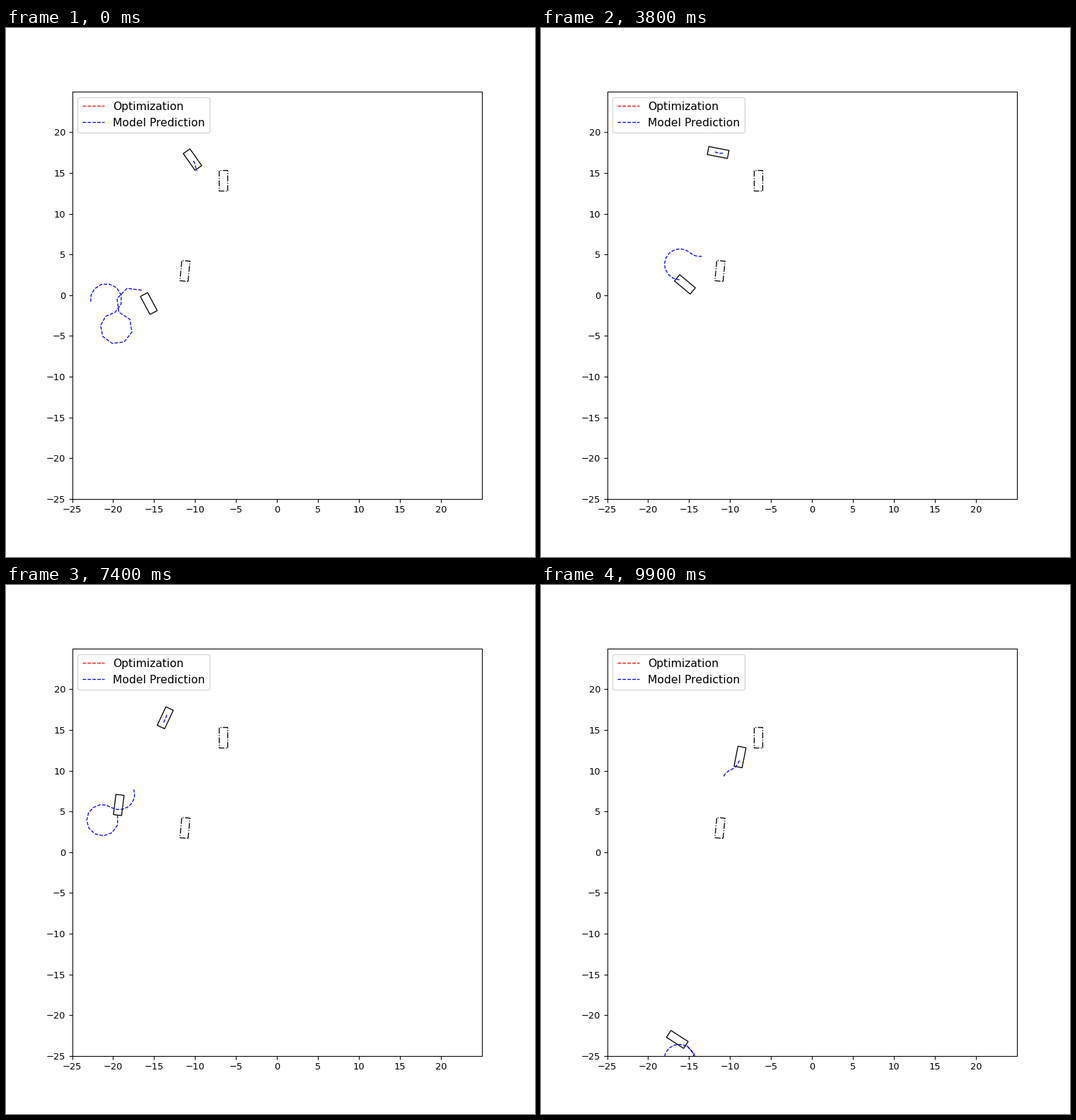
Animation of 748x748 px, one loop 10 s. Source, as a matplotlib script:

```python
import numpy as np
import matplotlib.pyplot as plt
from matplotlib.animation import FuncAnimation
from matplotlib.patches import Rectangle

FRAMES, INTERVAL = 100, 100
CURVATURE = 0.515          # heading change per unit travelled at full lock
LENGTH, WIDTH = 2.5, 1.0
STEP = np.arange(20)       # prediction horizon

# Waypoints: x, y, heading (deg), speed, steps until the car would stop,
# step where it starts to steer right, steps it keeps steering right
TIMES = [0, 24, 38, 54, 74, 83, 99]
LOWER = np.array([
    (-15.65, -1.03, 118, 1.85, 34, 4, 7.1),
    (-19.48, 0.40, 243, 0.74, 18, 1, 10),
    (-15.51, 1.32, 140, 0.86, 22, 1, 11.3),
    (-12.97, -2.64, 39, 0.97, 45, 1, 12),
    (-19.31, 5.79, 263, 1.25, 28, 0.6, 10.7),
    (-17.97, -6.08, 262, 1.50, 26, 0.35, 11.1),
    (-16.44, -22.99, 327, 1.42, 20, 0.3, 18),
])
# The upper car creeps, so only its steering start differs
UPPER = np.array([(*pose, 14, lead, 5) for *pose, lead in [
    (-10.32, 16.64, -55, 0.20, 0),
    (-10.13, 16.46, -62, -0.45, 14),
    (-11.46, 17.51, -11, -0.40, 14),
    (-13.55, 16.61, -121, 0.14, 14),
    (-13.64, 16.49, -115, -0.40, 0),
    (-13.80, 15.08, -69, 0.34, 5),
    (-8.79, 11.68, -101, 0.44, 0),
]])


def unit(angle):
    return np.array([np.cos(angle), np.sin(angle)])


def hermite(p0, p1, m0, m1, u):
    """Cubic position and its derivative at u in [0, 1]."""
    pos = ((2 * u**3 - 3 * u**2 + 1) * p0 + (u**3 - 2 * u**2 + u) * m0
           + (3 * u**2 - 2 * u**3) * p1 + (u**3 - u**2) * m1)
    vel = (6 * (u**2 - u) * (p0 - p1) + (3 * u**2 - 4 * u + 1) * m0
           + (3 * u**2 - 2 * u) * m1)
    return pos, vel


def drive(points, n, follow):
    """Pose and plan at frame n; follow aligns the car with its path."""
    i = max(np.searchsorted(TIMES, n) - 1, 0)
    a, b = points[i], points[i + 1]
    span = TIMES[i + 1] - TIMES[i]
    u = (n - TIMES[i]) / span
    pos, vel = hermite(a[:2], b[:2], a[3] * span * unit(np.radians(a[2])),
                       b[3] * span * unit(np.radians(b[2])), u)
    mix = a + (b - a) * u
    heading = np.arctan2(vel[1], vel[0]) if follow else np.radians(mix[2])
    return pos, heading, mix[3:]


def predict(pos, heading, speed, stop, lead, swing):
    """Roll out a slowing car that steers left, right, then left again."""
    ahead = speed if speed > 0 else -0.4 * speed
    dist = ahead * np.maximum(0, 1 - STEP / stop)
    dist[0] = speed
    right = np.clip(np.minimum(STEP + 1, lead + swing)
                    - np.maximum(STEP, lead), 0, 1)
    turns = CURVATURE * dist * (1 - 2 * right)
    headings = heading + np.cumsum(turns) - turns
    return pos[:, None] + np.cumsum(dist * unit(headings), axis=1)


def box(x, y, angle, style="-"):
    patch = Rectangle((x - LENGTH / 2, y - WIDTH / 2), LENGTH, WIDTH,
                      angle=angle, rotation_point="center", fill=False,
                      ec="k", lw=1, ls=style)
    return ax.add_patch(patch)


fig = plt.figure(figsize=(8, 8), dpi=93.5)
ax = fig.add_subplot()
ticks = np.arange(-25, 25, 5)
ax.set(xlim=(-25, 25), ylim=(-25, 25), xticks=ticks, yticks=ticks)

box(-6.6, 14.05, 90, "-.")
box(-11.24, 2.97, 84.5, "-.")

ax.plot([], [], "r--", lw=1, label="Optimization")
cars = []
for points, follow in ((UPPER, False), (LOWER, True)):
    label = None if cars else "Model Prediction"
    line, = ax.plot([], [], "b--", lw=1, label=label)
    cars.append((points, follow, box(0, 0, 0), line))
ax.legend(loc="upper left", fontsize=12)


def update(n):
    for points, follow, body, line in cars:
        pos, heading, plan = drive(points, n, follow)
        body.set_xy(pos - [LENGTH / 2, WIDTH / 2])
        body.set_angle(np.degrees(heading))
        line.set_data(*predict(pos, heading, *plan))
    return [artist for car in cars for artist in car[2:]]


anim = FuncAnimation(fig, update, frames=FRAMES, interval=INTERVAL,
                     repeat=True, repeat_delay=0)
plt.show()
```
